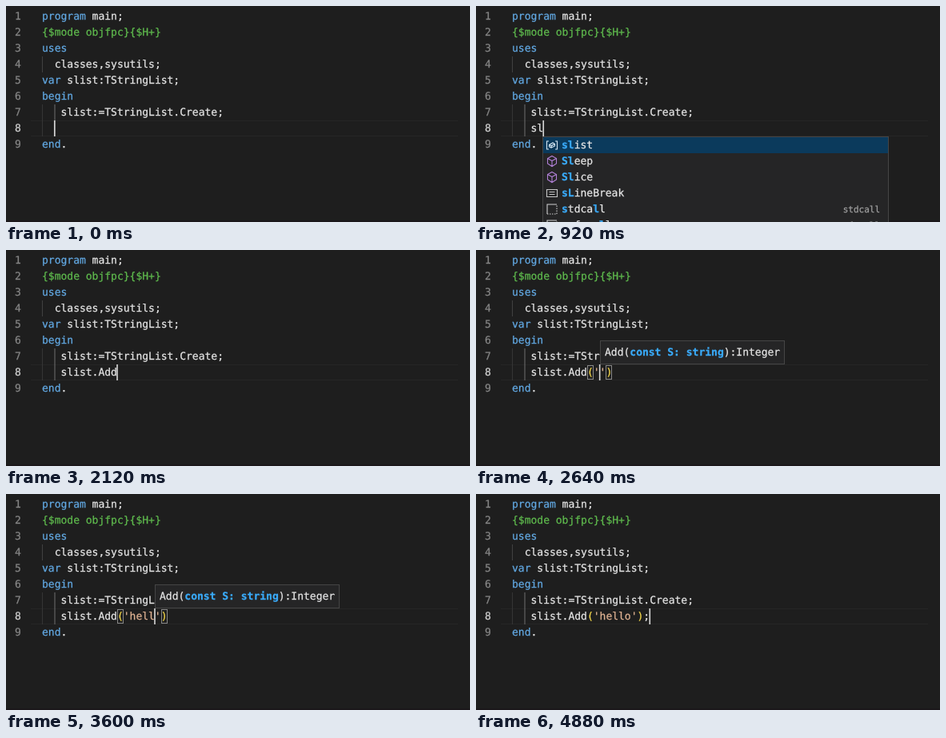
An HTML page with a canvas that plays this animation: 580 px wide and 270 px high, repeating every 4.96 s.

```html
<!DOCTYPE html>
<html lang="en">
<head>
<meta charset="utf-8">
<title>Code completion</title>
<style>
  html, body { margin: 0; width: 100%; height: 100%; overflow: hidden; background: #1e1e1e; }
  canvas { display: block; }
</style>
</head>
<body>
<canvas id="stage" width="580" height="270"></canvas>
<script>
const ctx = document.getElementById('stage').getContext('2d');
const LOOP = 4960, ROW = 20, LEFT = 45, CHAR = 7.826, BASELINE = 14.4;
const FONT = '"DejaVu Sans Mono", monospace';
const PLAIN = '#e6e6e6', KEYWORD = '#62a8e2', DIRECTIVE = '#5fbb4e',
      STRING = '#dfb292', BRACKET = '#f5d84a', MATCH = '#3aabfa',
      METHOD = '#b180d7', PANEL = '#252526', EDGE = '#454545';

const source = [
  [['program', KEYWORD], [' main;', PLAIN]],
  [['{$mode objfpc}{$H+}', DIRECTIVE]],
  [['uses', KEYWORD]],
  [['  classes,sysutils;', PLAIN]],
  [['var', KEYWORD], [' slist:TStringList;', PLAIN]],
  [['begin', KEYWORD]],
  [['   slist:=TStringList.Create;', PLAIN]],
  [],
  [['end', KEYWORD], ['.', PLAIN]],
];

const words = [
  ['slist', 'variable'], ['Sleep', 'method'], ['Slice', 'method'],
  ['sLineBreak', 'constant'], ['stdcall', 'snippet'], ['safecall', 'snippet'],
  ['SmallInt', 'constant'],
];
const members = ['Add', 'AddCommaText', 'AddDelimitedText', 'AddObject', 'AddPair', 'AddStrings']
  .map(name => [name, 'method']);

const columnX = col => LEFT + col * CHAR;
const suggest = (prefix, left) => () =>
  drawList(words, prefix, left ?? Math.floor(columnX(3 + prefix.length) - 0.5));
const suggestMember = prefix => () =>
  drawList(members, prefix, Math.floor(columnX(9 + prefix.length) - 0.5));
const hint = col => () => drawHint(Math.round(columnX(col)));

// [start ms, typed line with "|" as the caret, overlay]
const steps = [
  [0, '  |'],
  [240, '  '],
  [520, '   |'],
  [600, '   s|'],
  [720, '   s|', suggest('s', 48)],
  [840, '   sl|', suggest('s', 48)],
  [920, '   sl|', suggest('sl')],
  [1040, '   sli|', suggest('sli')],
  [1080, '   slis|', suggest('sli')],
  [1120, '   slis|', suggest('slis')],
  [1200, '   slist|', suggest('slis')],
  [1240, '   slist|', suggest('slist')],
  [1440, '   slist|'],
  [1520, '   slist'],
  [1680, '   slist.|'],
  [1760, '   slist.|', suggestMember('')],
  [1960, '   slist.A|', suggestMember('A')],
  [2120, '   slist.Add|'],
  [2400, '   slist.Add(|)'],
  [2480, '   slist.Add(|)', hint(13)],
  [2560, "   slist.Add('|')", hint(13)],
  [2640, "   slist.Add('|')", hint(14)],
  [2920, "   slist.Add('h|')", hint(14)],
  [2960, "   slist.Add('h|')", hint(15)],
  [3280, "   slist.Add('he|')", hint(15)],
  [3320, "   slist.Add('he|')", hint(16)],
  [3400, "   slist.Add('hel|')", hint(16)],
  [3440, "   slist.Add('hel|')", hint(17)],
  [3560, "   slist.Add('hell|')", hint(17)],
  [3600, "   slist.Add('hell|')", hint(18)],
  [3680, "   slist.Add('hello|')", hint(18)],
  [3720, "   slist.Add('hello|')", hint(19)],
  [3960, "   slist.Add('hello'|)", hint(19)],
  [4000, "   slist.Add('hello'|)", hint(20)],
  [4120, "   slist.Add('hello')|", hint(20)],
  [4160, "   slist.Add('hello')|", hint(21)],
  [4320, "   slist.Add('hello')|"],
  [4560, "   slist.Add('hello')"],
  [4880, "   slist.Add('hello');|"],
];

function rect(x, y, w, h, color) {
  ctx.fillStyle = color;
  ctx.fillRect(x, y, w, h);
}

function panel(x, y, w, h) {
  rect(x, y, w, h, EDGE);
  rect(x + 1, y + 1, w - 2, h - 2, PANEL);
}

// A hairline stroke gives the letters a slightly heavier weight.
function text(str, x, y, color, style = '13px') {
  ctx.font = `${style} ${FONT}`;
  ctx.fillStyle = ctx.strokeStyle = color;
  ctx.lineWidth = 0.25;
  ctx.fillText(str, x, y);
  ctx.strokeText(str, x, y);
}

// Draws [string, color, style] pieces one after another on the character grid.
function textRun(pieces, x, y) {
  for (const [str, color, style] of pieces) {
    text(str, x, y, color, style);
    x += str.length * CHAR;
  }
}

function strokePath(d, color, dash = []) {
  ctx.strokeStyle = color;
  ctx.lineWidth = 1.1;
  ctx.setLineDash(dash);
  ctx.stroke(new Path2D(d));
  ctx.setLineDash([]);
}

const icons = {
  method() {
    strokePath('M0 -6.5L5.5 -3.5V3L0 6.5L-5.5 3V-3.5ZM-5.5 -3.5L0 -.5L5.5 -3.5M0 -.5V6.5', METHOD);
  },
  variable() {
    strokePath('M-4 -5H-6.5V5H-4M4 -5H6.5V5H4M-3.5 -.5L1 -3L3.5 -1.5V1L-1 3.2L-3.5 2ZM-3.5 -.5L-1 .8L3.5 -1.5M-1 .8V3', '#d5e5f2');
  },
  constant() {
    strokePath('M-6.5 -4.5H6.5V4.5H-6.5ZM-3.5 -1.5H3.5M-3.5 1.5H3.5', '#c5c5c5');
  },
  snippet() {
    strokePath('M-6 6V-6H6', '#d0d0d0');
    strokePath('M-6 6H6V-6', '#d0d0d0', [1.5, 1.5]);
  },
};

// Splits a name into letters and marks those that follow the typed prefix in order.
function matchLetters(name, prefix) {
  let found = 0;
  const pieces = [...name].map(c => {
    const hit = found < prefix.length && c.toLowerCase() === prefix[found].toLowerCase();
    if (hit) found++;
    return hit ? [c, MATCH, 'bold 13px'] : [c, PLAIN];
  });
  return found === prefix.length ? pieces : null;
}

function drawList(items, prefix, left) {
  const width = 433, top = 163;
  const rows = items
    .map(([name, icon]) => ({ name, icon, pieces: matchLetters(name, prefix) }))
    .filter(row => row.pieces);
  panel(left, top, width, rows.length * ROW + 2);
  rect(left + 1, top + 1, width - 2, ROW, '#0b3a5c');
  rows.forEach(({ name, icon, pieces }, i) => {
    const y = top + 1 + i * ROW;
    ctx.save();
    ctx.translate(left + 12, y + 10);
    icons[icon]();
    ctx.restore();
    textRun(pieces, left + 24, y + BASELINE);
    if (icon === 'snippet') text(name, left + 422 - name.length * 6.62, y + 14, '#a0a0a0', '11px');
  });
}

function drawHint(left) {
  panel(left, 113, 231, 30);
  textRun([['Add(', PLAIN], ['const S: string', MATCH, 'bold 13px'], ['):Integer', PLAIN]],
    left + 6, 118 + BASELINE);
}

function drawTyped(line) {
  const caret = line.indexOf('|');
  const code = line.replace('|', '');
  const tokens = code.match(/[()]|'[^']*'|[^()']+/g);
  textRun(tokens.map(s => [s, /[()]/.test(s) ? BRACKET : s[0] === "'" ? STRING : PLAIN]),
    LEFT, 143 + BASELINE);

  if (code.includes('(') && !code.endsWith(';')) {
    ctx.strokeStyle = '#888';
    ctx.lineWidth = 1;
    for (const col of [code.indexOf('('), code.indexOf(')')])
      ctx.strokeRect(Math.round(columnX(col)) + 0.5, 144.5, 7, 17);
  }
  if (caret >= 0) rect(columnX(caret) - 0.7, 143, 1.6, ROW, '#d8d8d8');
}

function draw(time) {
  const [, line, overlay] = steps.findLast(step => step[0] <= time);
  rect(0, 0, 580, 270, '#1e1e1e');
  rect(0, 268, 580, 2, '#1b181a');
  rect(31, 143, 534, 1, '#262626');
  rect(31, 162, 534, 1, '#262626');

  rect(LEFT, 63, 1, ROW, '#404040');
  rect(LEFT, 123, 1, 2 * ROW, '#353535');
  rect(60.5, 123, 1, 2 * ROW, '#707070');

  source.forEach((pieces, i) => {
    const y = 3 + i * ROW + BASELINE;
    text(String(i + 1), 11, y, i === 7 ? '#d0d0d0' : '#858585');
    textRun(pieces, LEFT, y);
  });
  drawTyped(line);
  overlay?.();
}

ctx.textRendering = 'geometricPrecision';
const start = performance.now();
function tick() {
  draw((performance.now() - start) % LOOP);
  requestAnimationFrame(tick);
}
tick();
</script>
</body>
</html>
```
